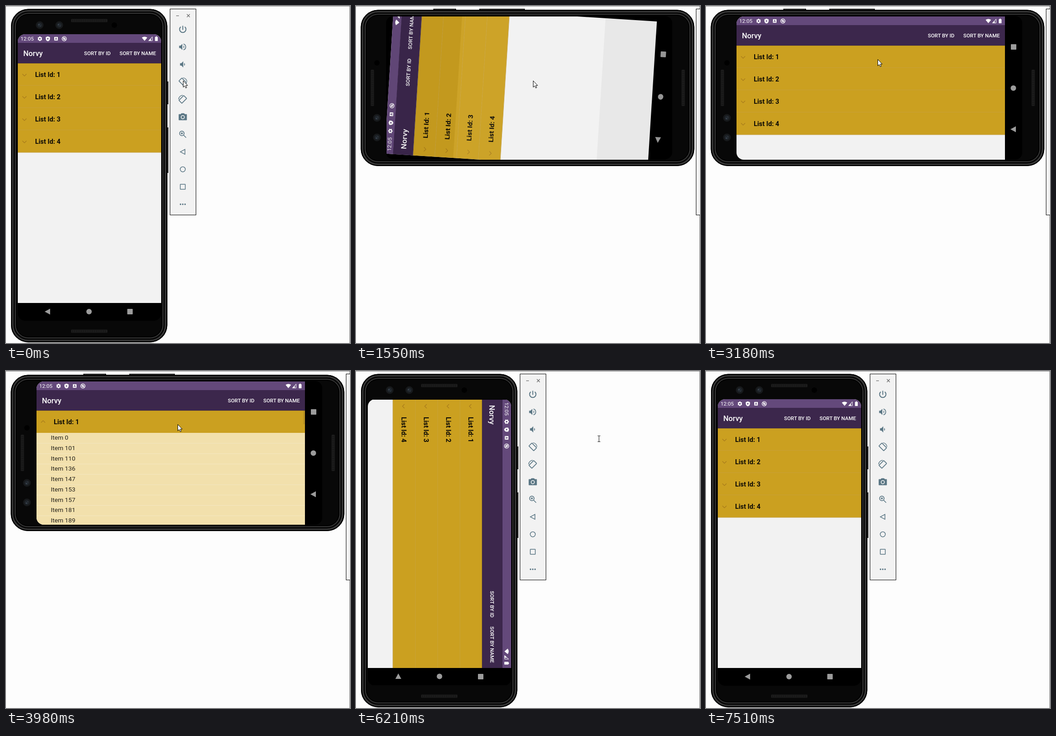
Write an HTML page that moves like this. It is 756x741 px and loops after 8550 ms.

```html
<!DOCTYPE html>
<html lang="en">
<head>
<meta charset="utf-8">
<title>Rotating list</title>
<style>
html, body { margin: 0; width: 100%; height: 100%; overflow: hidden; background: #fdfdfd; }
svg { display: block; }
text { font-family: Roboto, sans-serif; white-space: pre; }
.time { font-size: 11.7px; fill: #fff; }
.title { font-size: 16.3px; font-weight: 500; fill: #fff; }
.menu { font-size: 11.45px; font-weight: 500; fill: #fff; }
.head { font-size: 14.4px; font-weight: 700; fill: #0a0805; }
.item { font-size: 13.7px; fill: #24211a; }
.line { fill: none; stroke: #5a7684; stroke-width: 1.7; }
.solid { fill: #5a7684; }
</style>
</head>
<body>
<svg id="stage" width="756" height="741" viewBox="0 0 756 741"></svg>
<script>
const LOOP = 8550;
const GOLD = '#cba020';
const PORTRAIT = { w: 315, h: 630, x: 26, y: 62 };
const LANDSCAPE = { w: 628, h: 315, x: 67, y: 23 };

const rect = (x, y, w, h, fill, more = '') =>
  `<rect x="${x}" y="${y}" width="${w}" height="${h}" fill="${fill}" ${more}/>`;
const circle = (x, y, r, fill, more = '') =>
  `<circle cx="${x}" cy="${y}" r="${r}" fill="${fill}" ${more}/>`;
const path = (d, more = 'class="line"') => `<path d="${d}" ${more}/>`;
const text = (x, y, cls, s) => `<text x="${x}" y="${y}" class="${cls}">${s}</text>`;
const at = (x, y, body, more = '') => `<g transform="translate(${x} ${y}) ${more}">${body}</g>`;

// Phone body, upright
function phone() {
  const ring = (d, w, color) =>
    rect(11 + d, 6.5 + d, 343.5 - 2 * d, 733 - 2 * d, 'none',
      `rx="${38 - d}" stroke="${color}" stroke-width="${w}"`);
  const grille = y => {
    let s = rect(143, y, 80, 7, '#1c1c1c', 'rx="1.5"');
    for (let x = 146; x < 222; x += 4) s += rect(x, y + 1, 1, 5, '#121212');
    return s;
  };
  const lens = x => circle(x, 42, 8.5, '#17191b') + circle(x, 42, 5, '#20262c') +
    circle(x - 1.5, 41, 1.6, '#3c4650') + circle(x + 2, 44, 1, '#363c42');
  return rect(353.5, 166.5, 3, 49, '#1b1b1b', 'stroke="#000"') +
    rect(353.5, 267.5, 3, 99, '#1b1b1b', 'stroke="#000"') +
    rect(355, 168, 1, 46, '#4a4a4a') + rect(355, 269, 1, 96, '#4a4a4a') +
    rect(11, 6.5, 343.5, 733, '#080808', 'rx="38"') +
    ring(1, 2, '#000') + ring(4, 2.5, '#3f3f3f') + ring(7, 2.5, '#0a0a0a') +
    ring(9.7, 1.6, '#444') + ring(12, 2, '#000') +
    grille(28.5) + grille(711.5) + lens(74) + lens(117) +
    circle(238, 42, 6, '#000') +
    rect(26, 62, 315, 629, '#000', 'rx="16"');
}

function statusIcons(w) {
  const white = 'fill="#fff"';
  let gear = circle(0, 0, 2.9, 'none', 'stroke="#fff" stroke-width="2.2"');
  for (let a = 0; a < 360; a += 60) gear += rect(-1.2, -5, 2.4, 2, '#fff', `transform="rotate(${a})"`);
  return at(48.5, 10, gear) +
    at(66, 10, path('M0-5.3L4.6-3.4V0C4.6 2.8 2.7 4.7 0 5.5C-2.7 4.7-4.6 2.8-4.6 0V-3.4Z', white) +
      path('M-1.4-2.2L2.3 0L-1.4 2.2Z', 'fill="#624878"')) +
    at(84, 10, rect(-4, -4, 8, 8, '#fff', 'rx="1"') +
      path('M-2 2.5L0-2.5L2 2.5M-1.2 1H1.2', 'fill="none" stroke="#624878"')) +
    at(102, 10, circle(0, 0, 4.8, 'none', 'stroke="#fff" stroke-width="1.3"') +
      circle(0, 0, 2, 'none', 'stroke="#fff" stroke-width="1.3"') +
      path('M-3.4-3.4L3.6 3.6', 'stroke="#fff" stroke-width="1.2"')) +
    at(w - 36.5, 10, path('M0 4.8L-6-2.4Q0-6.6 6-2.4Z', white)) +
    at(w - 23.5, 10, path('M-4 4.3H4V-4.3Z', 'fill="none" stroke="#fff"') + path('M-4 4.3H1V-1Z', white)) +
    at(w - 10.5, 10, rect(-3, -4, 6, 9, '#fff', 'rx=".7"') + rect(-1.3, -5.2, 2.6, 2, '#fff'));
}

function listRows(w, open) {
  const row = (y, n, up) => rect(0, y, w, 49, GOLD) +
    path(up ? 'M10 26.5L14.5 22L19 26.5' : 'M10 23.5L14.5 28L19 23.5',
      `transform="translate(0 ${y})" fill="none" stroke="#a67a1c" stroke-width="1.1"`) +
    text(38, y + 30.4, 'head', 'List Id: ' + n);
  let s = '';
  if (open) {
    s += rect(0, 113, w, 202, '#f2e0ac') + row(64, 1, true);
    [0, 101, 110, 136, 147, 153, 157, 181, 189].forEach((n, i) => {
      const y = 113 + i * 22.75;
      s += text(31.5, y + 15, 'item', 'Item ' + n) + rect(0, y + 22.5, w, 1, '#f4e7c2');
    });
    return s + rect(w - 3.5, 64, 3, 30, '#b58f24');
  }
  for (let i = 0; i < 4; i++) {
    s += row(64 + i * 49, i + 1);
    s += rect(0, 112.5 + i * 49, w, 1, '#c5a34e');
  }
  return s;
}

// Whole phone screen in its own coordinates
function screen({ w, h }, open) {
  const tall = h > w;
  const cw = tall ? w : w - 38;
  const ch = tall ? h - 39 : h;
  const nav = tall ? [[65, 610], [156.5, 610], [246.5, 610]] : [[608, 248], [608.5, 157.5], [609, 67]];
  const [back, home, recent] = nav;
  return rect(0, 0, w, h, '#000') + rect(0, 0, cw, ch, '#f2f2f2') +
    listRows(cw, open) +
    rect(0, 64, cw, 1, '#000', 'opacity=".13"') +
    rect(0, 0, cw, 19.5, '#64497b') + rect(0, 19, cw, 45, '#3c274c') +
    text(6, 14.2, 'time', '12:05') + statusIcons(cw) +
    text(12, 48, 'title', 'Norvy') +
    text(cw - 169.5, 46.3, 'menu', 'SORT BY ID') +
    text(cw - 91.5, 46.3, 'menu', 'SORT BY NAME') +
    at(...back, path('M-6 0L6-6.5V6.5Z', 'fill="#9c9c9c"')) +
    circle(...home, 6, '#9c9c9c') +
    rect(recent[0] - 6, recent[1] - 6, 12, 12, '#9c9c9c', 'rx="1"');
}

function toolbar() {
  const speaker = x => path(`M${x}-2.6h3l4-4.2v13.6l-4-4.2h-3z`, 'class="solid"');
  const turn = rect(-7.5, -4.6, 15, 9.2, 'none', 'class="line" rx=".8" transform="rotate(45)"') +
    path('M0-9A9.2 9.2 0 0 1 9.2 0', 'class="line" style="stroke-width:1.4"');
  const icons = [
    path('M0-8V1M-4.4-5.7A7 7 0 1 0 4.4-5.7', 'class="line" style="stroke-width:2"'),
    speaker(-8) + path('M1.5-3.4Q5 0 1.5 3.4Z', 'class="solid"') + path('M1.5-6.4A6.6 6.6 0 0 1 1.5 6.4'),
    speaker(-6) + path('M3-3.4Q6.8 0 3 3.4Z', 'class="solid"'),
    turn,
    `<g transform="scale(-1 1)">${turn}</g>`,
    path('M-8.5-5.5H-4.5L-2.8-7.5H2.8L4.5-5.5H8.5V7H-8.5Z', 'class="solid" stroke="#5a7684" stroke-linejoin="round"') +
      circle(0, .6, 3.6, '#5a7684', 'stroke="#f2f2f2" stroke-width="1.6"'),
    circle(-2, -2, 5, 'none', 'class="line"') + path('M1.8 1.8L7.3 7.3M-4.4-2H.4M-2-4.4V.4'),
    path('M-5.3 0L4.8-5.4V5.4Z', 'class="line" style="stroke-width:1.5"'),
    circle(0, 0, 5.6, 'none', 'class="line" style="stroke-width:1.5"'),
    rect(-5.5, -5.5, 11, 11, 'none', 'class="line" rx=".6" style="stroke-width:1.5"'),
    [-5, 0, 5].map(x => circle(x, 0, 1.7, '#5a7684')).join('')
  ];
  return rect(360.5, 6.5, 57, 453, '#f2f2f2', 'stroke="#000"') +
    path('M374 21.5H380', 'stroke="#666" stroke-width="1.2"') +
    path('M397.5 18L404 24.5M404 18L397.5 24.5', 'stroke="#666" stroke-width="1.2"') +
    rect(373, 152, 33, 30, '#dedede', 'id="press"') +
    icons.map((s, i) => at(388.5, 51.5 + i * 38.45, s)).join('');
}

document.getElementById('stage').innerHTML =
  `<clipPath id="clip"><rect id="window" rx="16"/></clipPath>` +
  rect(0, 0, 756, 741, '#fdfdfd') + rect(0, 0, 756, 1, '#8c8c8c') + rect(755, 0, 1, 741, '#6e6e6e') +
  `<g id="tools">${toolbar()}</g><g id="phone">${phone()}</g>` +
  `<g clip-path="url(#clip)"><g id="views">${rect(0, 0, 1, 1, '#fafafa', 'id="blank"')}` +
  `<g id="tall">${screen(PORTRAIT)}</g>` +
  `<g id="wide"><g id="shut">${screen(LANDSCAPE)}</g><g id="open">${screen(LANDSCAPE, true)}</g></g></g></g>` +
  `<g id="arrow">${path('M.5 .5V14.5L3.7 11.6L6 16.4L8.2 15.4L6 10.8H10.3Z',
    'fill="#fff" stroke="#000" stroke-width="1"')}</g>` +
  `<g id="beam">${path('M-3-6.5H-1Q0-6.5 0-5.5V5.5Q0 6.5-1 6.5H-3M3-6.5H1Q0-6.5 0-5.5V5.5Q0 6.5 1 6.5H3',
    'fill="none" stroke="#222" stroke-width="1.1"')}</g>`;

// [start, device layout, progress of the turn]
const TURNS = [
  [0, PORTRAIT, 1], [750, LANDSCAPE, 0], [1550, LANDSCAPE, .04], [1670, LANDSCAPE, .35],
  [1820, LANDSCAPE, .85], [1970, LANDSCAPE, 1], [6210, PORTRAIT, 0], [6460, PORTRAIT, .004],
  [6740, PORTRAIT, .04], [6860, PORTRAIT, .207], [6980, PORTRAIT, .6], [7130, PORTRAIT, .93],
  [7250, PORTRAIT, 1]
];
// [start, pointer, x, y]
const POINTER = [
  [0, 'arrow', 389, 164], [2790, 'arrow', 384, 152], [2940, 'arrow', 381, 138],
  [3060, 'arrow', 378, 122], [3180, 'arrow', 377, 117], [5200, 'arrow', 424, 126],
  [5320, 'arrow', 586, 158], [5440, 'arrow', 738, 186], [5560, 'arrow', 790, 186],
  [5680, 'arrow', 668, 168], [5800, 'arrow', 531, 148], [6210, 'beam', 534, 149],
  [6600, 'beam', 667, 312], [6740, 'beam', 663, 450], [6860, 'beam', 653, 572],
  [6980, 'beam', 653, 655], [7130, 'beam', 652, 702], [7250, 'beam', 651, 726],
  [7390, 'beam', 645, 734], [7510, 'none', 0, 0]
];

const el = id => document.getElementById(id);
const show = (node, on) => { node.style.display = on ? '' : 'none'; };
const set = (node, attrs) => { for (const k in attrs) node.setAttribute(k, attrs[k]); };
const stepAt = (table, t) => table.findLast(row => row[0] <= t);

function place(node, size, device, angle, sx, sy) {
  set(node, { transform: `translate(${device.x + device.w / 2} ${device.y + device.h / 2}) ` +
    `rotate(${angle}) scale(${sx} ${sy}) translate(${-size.w / 2} ${-size.h / 2})` });
}

function drawTurn(device, p) {
  const upright = device === PORTRAIT;
  const old = upright ? LANDSCAPE : PORTRAIT;
  const [next, prev] = upright ? [el('tall'), el('wide')] : [el('wide'), el('tall')];
  const angle = (upright ? 90 : -90) * (1 - p);
  const grow = .5 + p / 2;
  const [sx, sy] = upright ? [1, grow] : [grow, 1];

  set(el('window'), { x: device.x, y: device.y, width: device.w, height: device.h });
  set(el('phone'), { transform: upright ? '' : 'translate(4 363) rotate(-90)' });
  set(el('tools'), { transform: upright ? '' : 'translate(387 0)' });
  set(el('blank'), { width: device.w, height: device.h });
  for (const node of [el('blank'), next]) place(node, device, device, angle, sx, sy);
  place(prev, old, device, angle, upright ? 1 - p / 2 : 1 + p, upright ? 1 + p : 1 - p / 2);

  show(el('blank'), p > 0 && p < .5);
  show(next, p >= .5);
  show(prev, p < 1);
  set(next, { opacity: 1 });
  set(prev, { opacity: 1 - p });
  if (prev.nextElementSibling) el('views').append(prev);
}

function draw() {
  const t = performance.now() % LOOP;
  const [, device, p] = stepAt(TURNS, t);
  const [, kind, x, y] = stepAt(POINTER, t);
  const open = t >= 3980 && t < 4510;
  drawTurn(device, p);
  show(el('open'), open);
  show(el('shut'), !open);
  show(el('press'), t >= 500 && t < 750);
  for (const id of ['arrow', 'beam']) {
    show(el(id), id === kind);
    set(el(id), { transform: `translate(${x} ${y})` });
  }
  requestAnimationFrame(draw);
}
draw();
</script>
</body>
</html>
```
